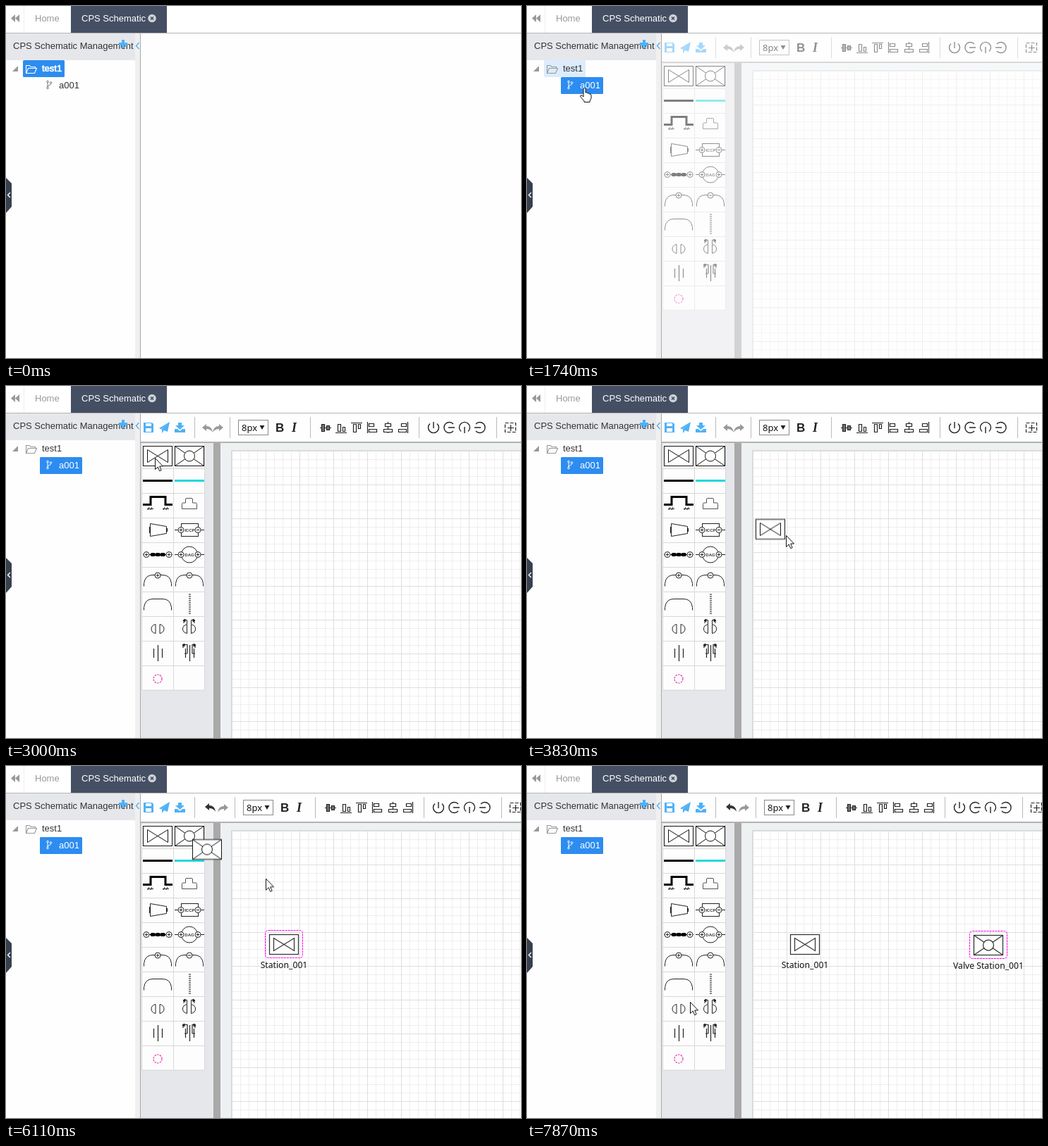
Write an HTML page that moves like this. It is 730 by 500 pixels and loops after 8 s.

```html
<!DOCTYPE html>
<html lang="en">
<head>
<meta charset="utf-8">
<title>CPS Schematic</title>
<style>
html, body { margin: 0; width: 100%; height: 100%; overflow: hidden; background: #fefefe; }
svg { display: block; width: 730px; height: 500px; }
text { font: 13px "Liberation Sans", Arial, sans-serif; fill: #333; stroke: none; }
.noto { font: 12.2px "Noto Sans", "Open Sans", sans-serif; fill: #111; }
.mid { text-anchor: middle; }
.line { fill: none; stroke: #222; }
.ink { stroke: #111; }
.placed { stroke: #333; stroke-width: 1.25; }
.pick { fill: none; stroke: #f0e; stroke-dasharray: 3 1; }
.blue { fill: #4fb1f8; }
.sep { stroke: #bbb; }

/* every part shares one clock and holds its value unless told otherwise */
.a { animation: 8s step-end infinite; }
.root { animation-name: root; }
.root-ink { animation-name: rootInk; }
.leaf { animation-name: leaf; }
.leaf-ink { animation-name: leafInk; }
.editor { animation-name: editor; }
.shift { animation-name: shift; }
.before { animation-name: before; }
.after { animation-name: after; }
.pick1 { animation-name: pick1; }
.second { animation-name: second; }
.pointer { animation-name: pointer; }
.arrow { animation-name: arrow; }
.hand { animation-name: hand; }
.drag1 { animation-name: drag1; }
.drag2 { animation-name: drag2; }

@keyframes root { 0% { fill: #2d8cf0 } 20.125% { fill: #abd1f8 } 21.75% { fill: #dcecfd } 25.125%, to { fill: transparent } }
@keyframes rootInk { 0% { fill: #fff; stroke: #fff } 20.125%, to { fill: #333; stroke: #999 } }
@keyframes leaf { 0% { fill: transparent } 16.75% { fill: #d5e8fc } 20.125%, to { fill: #2d8cf0 } }
@keyframes leafInk { 0% { fill: #333; stroke: #777 } 20.125%, to { fill: #fff; stroke: #fff } }
@keyframes editor { 0% { opacity: 0 } 21.75% { opacity: .5 } 25.125%, to { opacity: 1 } }
@keyframes shift { 0% { transform: none } 60.375%, to { transform: translateX(7px) } }
@keyframes before { 0% { opacity: 1 } 60.375%, to { opacity: 0 } }
@keyframes after { 0% { opacity: 0 } 60.375%, to { opacity: 1 } }
@keyframes pick1 { 0% { opacity: 0 } 60.375% { opacity: 1 } 88%, to { opacity: 0 } }
@keyframes second { 0% { opacity: 0 } 88%, to { opacity: 1 } }
@keyframes arrow { 0% { opacity: 0 } 8.875% { opacity: 1 } 21.75% { opacity: 0 } 28.66%, to { opacity: 1 } }
@keyframes hand { 0% { opacity: 0 } 21.75% { opacity: 1 } 28.66%, to { opacity: 0 } }
@keyframes pointer {
  0% { transform: translate(86px, 267px) }
  8.875% { transform: translate(86px, 267px); animation-timing-function: steps(5) }
  16.75% { transform: translate(79px, 115px) }
  25.125% { transform: translate(79px, 115px); animation-timing-function: steps(7) }
  37.5% { transform: translate(211px, 102px); animation-timing-function: steps(6) }
  47.875% { transform: translate(367px, 212px); animation-timing-function: steps(2) }
  51.25% { transform: translate(394px, 236px); animation-timing-function: steps(3) }
  56.5% { transform: translate(394px, 253px) }
  60.375% { transform: translate(394px, 253px); animation-timing-function: steps(2) }
  64.125% { transform: translate(222px, 114px); animation-timing-function: steps(5) }
  72.875% { transform: translate(252px, 103px); animation-timing-function: steps(6) }
  83.125% { transform: translate(600px, 273px); animation-timing-function: steps(2) }
  86.5% { transform: translate(654px, 254px) }
  88% { transform: translate(640px, 240px); animation-timing-function: steps(2) }
  91.5% { transform: translate(440px, 216px); animation-timing-function: steps(3) }
  96.625% { transform: translate(222px, 330px) }
  98.375%, to { transform: translate(231px, 335px) }
}
@keyframes drag1 {
  0% { opacity: 0; transform: translate(245px, 128.5px) }
  40.95% { opacity: 1; transform: translate(245px, 128.5px); animation-timing-function: steps(4) }
  47.875% { opacity: 1; transform: translate(345px, 203.5px); animation-timing-function: steps(2) }
  51.25% { opacity: 1; transform: translate(392px, 230.5px); animation-timing-function: steps(3) }
  56.5% { opacity: 1; transform: translate(394px, 253.5px) }
  60.375%, to { opacity: 0; transform: translate(394px, 253.5px) }
}
@keyframes drag2 {
  0% { opacity: 0; transform: translate(285px, 118.5px) }
  76.25% { opacity: 1; transform: translate(285px, 118.5px); animation-timing-function: steps(4) }
  83.125% { opacity: 1; transform: translate(580px, 268.5px); animation-timing-function: steps(2) }
  86.5% { opacity: 1; transform: translate(653px, 254.5px) }
  88%, to { opacity: 0; transform: translate(653px, 254.5px) }
}
</style>
</head>
<body>
<svg viewBox="0 0 730 500" xmlns="http://www.w3.org/2000/svg">
<defs>
  <pattern id="grid" x="320" y="92" width="48" height="48" patternUnits="userSpaceOnUse">
    <path d="M12.5 0V48M24.5 0V48M36.5 0V48M0 12.5H48M0 24.5H48M0 36.5H48" stroke="#eeeeee"/>
    <path d="M.5 0V48M0 .5H48" stroke="#dedede"/>
  </pattern>
  <g id="station" fill="none">
    <rect x="-20.5" y="-14" width="41" height="28" fill="#fff"/>
    <path d="M-14.5 -9L14.5 9V-9L-14.5 9Z"/>
  </g>
  <g id="valve" fill="none">
    <rect x="-20.5" y="-14" width="41" height="28" fill="#fff"/>
    <path d="M-20.5 -14L20.5 14M20.5 -14L-20.5 14"/>
    <circle r="7.5" fill="#fff"/>
  </g>
  <g id="minus"><circle r="4" fill="#fff"/><path d="M-2.2 0H2.2"/></g>
  <g id="plus"><use href="#minus"/><path d="M0 -2.2V2.2"/></g>
  <path id="arch" d="M-19.5 9V5Q-18 -7 -7 -7H7Q18 -7 19.5 5V9"/>
  <path id="back" d="M0 5L6 0V3Q14 3 15 12Q12 7 6 7V10Z"/>
</defs>

<!-- tabs -->
<rect width="730" height="38" fill="#fff"/>
<path d="M25.5 0V38" stroke="#eee"/>
<path d="M13 12V23L7 17.5ZM19 12V23L13 17.5Z" fill="#999"/>
<text x="41" y="22" style="fill:#999">Home</text>
<rect x="92" width="136" height="38" fill="#454f63"/>
<text x="107" y="22" style="fill:#fff">CPS Schematic</text>
<circle cx="207" cy="17.5" r="5.8" fill="#d0d3d8"/>
<path d="M205 15.5L209 19.5M209 15.5L205 19.5" stroke="#454f63" stroke-width="1.7"/>
<path d="M0 38.5H730" stroke="#b4b4b4"/>

<!-- tree -->
<rect y="39" width="183" height="38" fill="#e6e7eb"/>
<rect x="183" y="39" width="7" height="461" fill="#f0f0f0"/>
<path d="M190.5 39V500" stroke="#aaa"/>
<text x="10" y="61">CPS Schematic Management</text>
<path d="M166 48V60M160 54H172" stroke="#4fb1f8" stroke-width="4"/>
<path d="M188.500 52L184.500 56.500L188.500 61" fill="none" stroke="#4fb1f8" stroke-width="1.400"/>
<path d="M9 93H17V85Z" fill="#999"/>
<rect class="a root" x="24" y="77" width="59" height="24" rx="1.500"/>
<g class="a root-ink" style="fill:#333" stroke-width="1.100">
  <path d="M28.500 95.500V84.500H33.500L35 86.500H41.500V88.500M28.500 95.500L31.500 88.500H43.500L40.500 95.500Z" fill="none"/>
</g>
<text class="a root-ink" x="51" y="93" stroke-width=".35"><tspan stroke="none">test1</tspan></text>
<text class="a before0" x="51" y="93" style="fill:none;animation-name:bold" stroke-width=".7">test1</text>
<rect class="a leaf" x="48" y="101" width="60" height="24" rx="1.500"/>
<g class="a leaf-ink">
  <g fill="none"><circle cx="59" cy="107.500" r="1.300"/><circle cx="59" cy="116.500" r="1.300"/><circle cx="63.500" cy="109" r="1.300"/>
  <path d="M59 109V115Q59 113 61.500 112.500Q63.500 112 63.500 110.500"/></g>
</g>
<text class="a leaf-ink" x="75" y="117"><tspan stroke="none">a001</tspan></text>
<path d="M0 244L8 252V285L0 294Z" fill="#36404f"/>
<path d="M6 265L2.500 268.500L6 272" fill="none" stroke="#fff" stroke-width="1.400"/>

<g class="a editor">
  <!-- workspace -->
  <rect x="191" y="39" width="539" height="41" fill="#fefefe"/>
  <rect x="191" y="81" width="103" height="419" fill="#e6e7eb"/>
  <rect x="294" y="81" width="10" height="419" fill="#a9a9a9"/>
  <rect x="304" y="81" width="426" height="419" fill="#eef1f2"/>
  <rect x="319" y="91" width="411" height="409" fill="#d6d9da"/>
  <rect x="320" y="92" width="410" height="408" fill="#fff"/>
  <rect x="320" y="92" width="410" height="408" fill="url(#grid)"/>
  <path d="M191 80H730" stroke="#b2b2b2" stroke-width="2"/>

  <!-- toolbar -->
  <g class="blue">
    <path d="M195 52H207L209 54V66H195Z"/>
    <path d="M217 60L232 51L229 65L224 63L221 67V61L229 54L220 61.500Z"/>
    <path d="M244 52H249V56H253L246.500 62L240 56H244ZM239 61H243L246.500 64L250 61H254V66H239Z"/>
  </g>
  <path d="M198 53H206V57H198ZM198 60H206V65H198Z" fill="#fff"/>
  <path class="sep" d="M267.500 44V74"/>
  <g class="a before" fill="#999"><use href="#back" x="278" y="54"/><use href="#back" transform="translate(308 54) scale(-1 1)"/></g>
  <g class="a after" style="opacity:0"><use href="#back" x="282" y="53" fill="#333"/><use href="#back" transform="translate(315 54) scale(-1 1)" fill="#999"/></g>
  <g class="a shift">
    <path class="sep" d="M317.500 44V74M431.500 44V74M585.500 44V74M695.500 44V74"/>
    <rect x="329.500" y="48.500" width="42" height="21" fill="#fff" stroke="#8a8a8a"/>
    <text class="noto" x="334" y="64" style="font-size:13px">8px</text>
    <path d="M359.500 56H366.500L363 62Z" fill="#222"/>
    <text x="382" y="65" style="font-weight:bold;font-size:17px;fill:#222">B</text>
    <text x="405" y="65" style="font:italic bold 18px 'Liberation Serif',serif;fill:#222">I</text>
    <g class="line" stroke-width="1.200">
      <path d="M445 59.500H461M467 66.500H483M489 52.500H505M512.500 51V67M541.500 51V67M569.500 51V67"/>
      <g fill="#fff">
        <path d="M447.500 54.500H451.500V64.500H447.500ZM454.500 56.500H458.500V62.500H454.500Z" fill="#777"/>
        <path d="M470.500 54.500H474.500V64.500H470.500ZM477.500 58.500H480.500V64.500H477.500Z"/>
        <path d="M492.500 54.500H496.500V65.500H492.500ZM499.500 54.500H502.500V60.500H499.500Z"/>
        <path d="M514.500 53.500H521.500V57.500H514.500ZM514.500 61.500H525.500V65.500H514.500Z"/>
        <path d="M537.500 53.500H545.500V57.500H537.500ZM535.500 61.500H547.500V65.500H535.500Z"/>
        <path d="M560.500 53.500H567.500V57.500H560.500ZM556.500 61.500H567.500V65.500H556.500Z"/>
      </g>
      <g stroke-width="1.400">
        <path d="M601 53.500A7.500 7.500 0 1 0 611 53.500M606 51V60"/>
        <path d="M634 54A7.500 7.500 0 1 0 634 64M627 59H636"/>
        <path d="M645 64.500A7.500 7.500 0 1 1 655 64.500M650 58V67"/>
        <path d="M666 54A7.500 7.500 0 1 1 666 64M664 59H673"/>
      </g>
      <rect x="707.500" y="52.500" width="15" height="13" stroke-dasharray="5 2"/>
      <path d="M711 59.500H720M715.500 55V64"/>
    </g>
  </g>

  <!-- palette -->
  <rect x="192" y="82" width="90" height="350" fill="#fdfdfd"/>
  <path d="M192.500 82V432M237.500 82V432M281.500 82V432M192 117.500H282M192 152.500H282M192 187.500H282M192 222.500H282M192 257.500H282M192 292.500H282M192 327.500H282M192 362.500H282M192 397.500H282M192 432H282" stroke="#d8d8d8"/>
  <g class="line">
    <use href="#station" x="215" y="99.500" class="ink"/>
    <use href="#valve" x="260" y="99.500" class="ink"/>
    <path d="M194 134.500H236" stroke="#000" stroke-width="3"/>
    <path d="M239 134.500H281" stroke="#22d8dc" stroke-width="3"/>
    <path d="M194 168.500H205V157.500H226V168.500H236" stroke="#000" stroke-width="3"/>
    <path d="M200 174.500H209M222 174.500H231M203 172L201 176M207 172L205 176M225 172L223 176M229 172L227 176"/>
    <path d="M249.500 174.500V167.500Q249.500 166 251 166H254.500V161Q254.500 159.500 256 159.500H263Q264.500 159.500 264.500 161V166H269Q270.500 166 270.500 167.500V174.500Z" stroke="#555"/>
    <path d="M204.500 195.500L227.500 199.500V209.500L204.500 213.500ZM203.500 200V209M228.500 202V207"/>
    <path d="M239 204.500H281M239 239.500H281M194 239.500H236"/>
    <rect x="248.500" y="195.500" width="24" height="18" fill="#fff"/>
    <circle cx="260" cy="239.500" r="11.500" fill="#fff"/>
    <use href="#plus" x="248" y="204.500"/><use href="#minus" x="272" y="204.500"/>
    <use href="#plus" x="248" y="239.500"/><use href="#plus" x="272" y="239.500"/>
    <use href="#plus" x="199" y="239.500"/><use href="#plus" x="231" y="239.500"/>
    <path d="M207 239.500H209.500M214 239.500H216.500M221 239.500H223.500" stroke="#000" stroke-width="5" stroke-linecap="round"/>
    <text class="mid" x="260.300" y="207" style="font-weight:bold;font-size:6px">ICCP</text>
    <text class="mid" x="260" y="242" style="font-weight:bold;font-size:6px">DAG</text>
    <use href="#arch" x="215" y="275.500"/><use href="#arch" x="260" y="275.500"/>
    <use href="#plus" x="215" y="269"/><use href="#minus" x="260" y="269"/>
    <use href="#arch" x="215" y="309.500"/>
    <path d="M260.500 295V324" stroke="#888" stroke-width="3" stroke-dasharray="2 1"/>
    <path d="M212 338.500V351.500Q206 350 206 345Q206 340 212 338.500ZM218 338.500V351.500Q224 350 224 345Q224 340 218 338.500Z"/>
    <path d="M256.500 338.500V351.500Q250.500 350 250.500 345Q250.500 340 256.500 338.500ZM262.500 338.500V351.500Q268.500 350 268.500 345Q268.500 340 262.500 338.500ZM256.500 338V332.500H252V337M262.500 338V332.500H267V337"/>
    <path d="M209.500 373V386M215.500 368V391M221.500 373V386" stroke-width="1.200"/>
    <path d="M254.500 373V386M260.500 368V391M266.500 373V386M257 380V367.500H251V372M264 380V367.500H268V372" stroke-width="1.200"/>
    <path d="M251 333L254 331V335ZM268 333L265 331V335ZM250 368L253 366V370ZM269 368L266 366V370ZM253 380H257M264 380H268" fill="#222"/>
    <circle cx="215" cy="416" r="6" stroke="#e3a" stroke-width="1.200" stroke-dasharray="2.500 1.300"/>
  </g>

  <!-- diagram -->
  <g class="a after" style="opacity:0">
    <use href="#station" x="394" y="253.500" class="placed"/>
    <text class="noto mid" x="394" y="287">Station_001</text>
  </g>
  <rect class="a pick pick1" x="367.500" y="233.500" width="53" height="39" rx="4"/>
  <g class="a second">
    <use href="#valve" x="654" y="254.500" class="placed"/>
    <rect class="pick" x="627.500" y="234.500" width="53" height="39" rx="4"/>
    <text class="noto mid" x="654" y="288">Valve Station_001</text>
  </g>
  <g class="a drag1 ink"><use href="#station"/></g>
  <g class="a drag2 ink"><use href="#valve"/></g>
</g>

<g class="a pointer" fill="#fff" stroke="#111" stroke-linejoin="round">
  <path class="a arrow" d="M.5 .5V16.500L4.200 13L6.700 18.700L9.200 17.600L6.700 12H11.500Z"/>
  <path class="a hand" d="M1 2.500Q2.500 .5 4 2.500V8Q6 7 7 9Q9 8 9.500 10Q12 9.500 12 12V16L10 20V21.500H2V20L-3.500 13.500Q-3.500 11 -1 12L1 14Z"/>
</g>
</svg>
<style>
@keyframes bold { 0% { stroke: #fff } 20.125%, to { stroke: none } }
</style>
</body>
</html>
```
